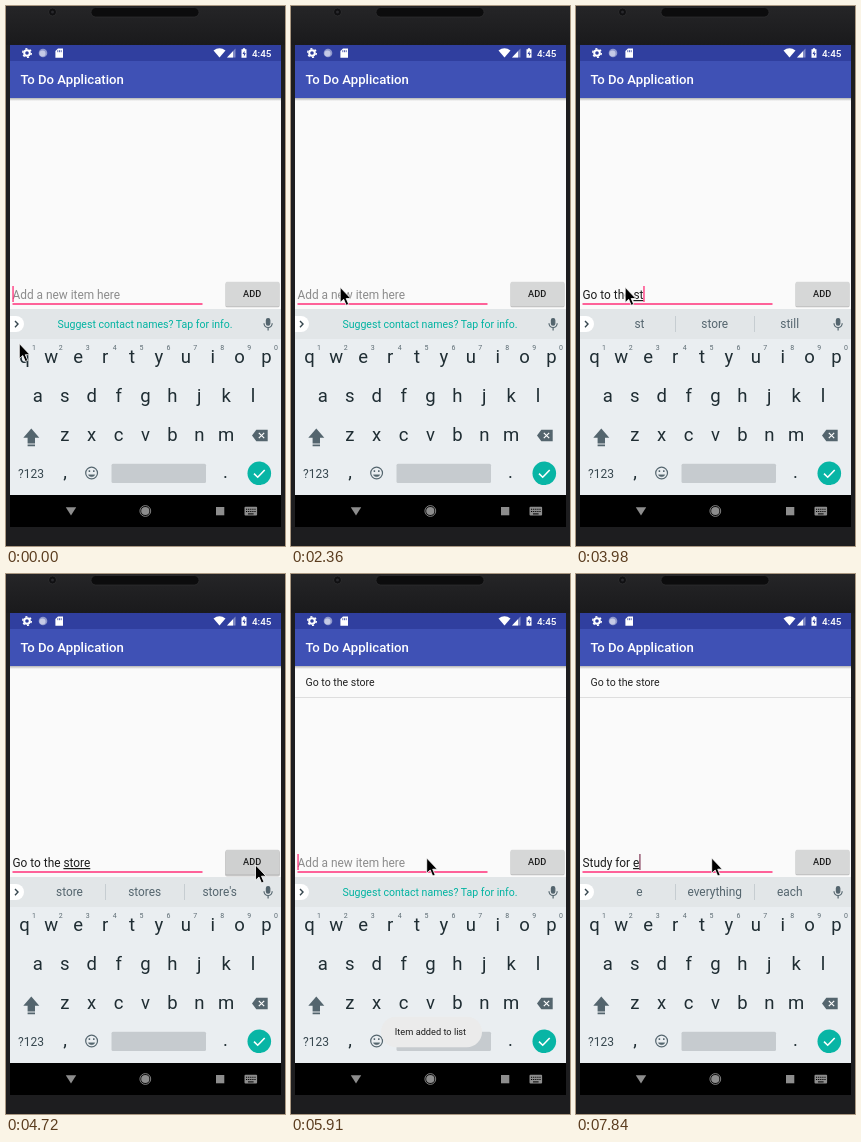
Recreate the animation shown at these times as an HTML page. Size 279 by 540 pixels, loop 8000 ms.

```html
<!DOCTYPE html>
<html lang="en">
<head>
<meta charset="utf-8">
<title>To Do</title>
<style>
html, body { margin: 0; width: 100%; height: 100%; overflow: hidden; background: #1d1d1f; }
svg { display: block; width: 100%; height: 100%; font-family: Roboto, sans-serif; }
text { white-space: pre; }
.mid { text-anchor: middle; }
.key { font-size: 18.5px; fill: #1f2d33; text-anchor: middle; }
.num { font-size: 7px; fill: #5c6b73; text-anchor: middle; }
.input { font-size: 11.87px; }
</style>
</head>
<body>
<svg viewBox="0 0 279 540">
  <defs>
    <linearGradient id="bezel" x2="0" y2="1">
      <stop offset="0" stop-color="#252527"/>
      <stop offset="1" stop-color="#1a1a1c"/>
    </linearGradient>
    <linearGradient id="shade" x2="0" y2="1">
      <stop offset="0" stop-color="#000" stop-opacity=".28"/>
      <stop offset="1" stop-color="#000" stop-opacity="0"/>
    </linearGradient>
  </defs>

  <!-- phone -->
  <rect width="279" height="540" fill="#1d1d1f"/>
  <rect width="279" height="39" fill="url(#bezel)"/>
  <rect x="85" y="1.5" width="108" height="9.5" rx="4.7" fill="#0c0c0d" stroke="#303032" stroke-width=".7"/>
  <circle cx="46.5" cy="6" r="4" fill="#101012" stroke="#303032" stroke-width=".8"/>
  <circle cx="46.5" cy="6" r="1.5" fill="#29292d"/>

  <!-- status and title bars -->
  <rect x="4" y="92" width="271" height="211" fill="#fafafa"/>
  <rect x="4" y="39" width="271" height="16" fill="#303f9f"/>
  <rect x="4" y="55" width="271" height="37" fill="#3f51b5"/>
  <rect x="4" y="92" width="271" height="3" fill="url(#shade)"/>
  <g fill="#fff">
    <circle cx="21" cy="47" r="2.8" fill="none" stroke="#fff" stroke-width="2"/>
    <circle cx="21" cy="47" r="4.3" fill="none" stroke="#fff" stroke-width="1.4" stroke-dasharray="2.1 2.4"/>
    <circle cx="37" cy="47" r="4.3" fill="#8f98cc"/>
    <circle cx="36.5" cy="47.5" r="3" fill="#c5cae6"/>
    <path d="M52 42.5h5v9.2h-7.6v-6.6z"/>
    <path d="M51.8 44.2v2M53.5 44.2v2M55.2 44.2v2" stroke="#303f9f" stroke-width=".8"/>
    <path d="M207.5 44.4Q213.5 39.9 219.5 44.4L213.5 51.6z"/>
    <path d="M221 51.5h8.5v-9z" opacity=".4"/>
    <path d="M221 51.5h6v-6.3z"/>
    <path d="M235.5 43.2h1.4v-1h2.2v1h1.4v8.6h-5z"/>
    <path d="M238.5 44.8l-2 3.2h1.4v2.6l2-3.4h-1.4z" fill="#303f9f"/>
    <text x="246" y="50.7" font-size="9.9" font-weight="500">4:45</text>
    <text x="14.6" y="78.3" font-size="13.15" font-weight="500">To Do Application</text>
  </g>

  <!-- list and entry row -->
  <g id="item">
    <text x="14.5" y="111.5" font-size="10.55" fill="#212121">Go to the store</text>
    <path d="M4 123.5H275" stroke="#dedede"/>
  </g>
  <rect id="press" x="219" y="277" width="55" height="25.5" rx="2" fill="#000" opacity=".2"/>
  <rect x="219.5" y="277" width="54" height="24.3" rx="1.5" fill="#bdbdbd"/>
  <rect id="button" x="219.5" y="275.8" width="54" height="24.5" rx="1.5" fill="#d6d7d7"/>
  <text class="mid" x="246.2" y="291.4" font-size="9.23" font-weight="500" fill="#1c1c1c">ADD</text>
  <text id="hint" class="input" x="6.5" y="293" fill="#8c8c8c">Add a new item here</text>
  <text id="entry" class="input" x="6.5" y="293" fill="#1c1c1c"><tspan id="plain"></tspan><tspan id="under" text-decoration="underline"></tspan></text>
  <path d="M6.5 298H196.5" stroke="#ff2f78" stroke-width="1.4"/>
  <rect id="caret" y="280" width="1.3" height="16"/>

  <!-- keyboard -->
  <rect x="4" y="303" width="271" height="186" fill="#eaeef1"/>
  <rect x="4" y="303" width="271" height="30" fill="#e2e6e8"/>
  <path d="M4 310h6a8 8 0 0 1 0 16H4z" fill="#fff"/>
  <path d="M9 315l3 3.1-3 3.1" fill="none" stroke="#37474f" stroke-width="1.4"/>
  <text id="tip" class="mid" x="139" y="322" font-size="10.55" fill="#00b3a1">Suggest contact names? Tap for info.</text>
  <g id="words" class="mid input" fill="#54656e">
    <path d="M99.5 310V326M178.5 310V326" stroke="#c6cdd1"/>
    <text x="63.5" y="322.4"></text>
    <text x="138.7" y="322.4"></text>
    <text x="213.7" y="322.4"></text>
  </g>
  <g stroke="#54656e" fill="none" stroke-width="1.2">
    <rect x="260.4" y="312.6" width="3.4" height="6.6" rx="1.7" fill="#54656e"/>
    <path d="M258 317.2a4.1 4.3 0 0 0 8.2 0M262.1 321.5v3"/>
  </g>
  <g id="keys"></g>
  <path d="M25.3 422.5l8 9.2h-4.3v5.8h-7.4v-5.8h-4.3zM21.6 438.6h7.4v1.6h-7.4z" fill="#54656e"/>
  <path d="M246 429.5l4.3-5.8h11.4v11.6h-11.4z" fill="#54656e"/>
  <path d="M252.8 426.8l5.4 5.4M258.2 426.8l-5.4 5.4" stroke="#fff" stroke-width="1.2"/>
  <text x="12" y="471.8" font-size="12" fill="#37474f">?123</text>
  <g fill="none" stroke="#54656e" stroke-width="1.2">
    <circle cx="85.6" cy="467" r="5.9"/>
    <path d="M82.3 468.8a3.6 3.2 0 0 0 6.6 0z" fill="#54656e" stroke-width=".4"/>
    <path d="M83.4 464.2v1.7M87.8 464.2v1.7" stroke-width="1.5"/>
  </g>
  <rect x="105.5" y="457.7" width="94.5" height="19.3" rx="1.5" fill="#c6cbcf"/>
  <circle cx="253.3" cy="467.3" r="11.8" fill="#08b5a5"/>
  <path d="M248 467.6l3.7 3.6 7-7.2" fill="none" stroke="#fff" stroke-width="1.6"/>

  <!-- navigation bar -->
  <rect x="4" y="489" width="271" height="32" fill="#000"/>
  <g fill="#8d8d8d">
    <path d="M59.8 501.2h10.4l-5.2 8.4z"/>
    <circle cx="139.3" cy="505" r="4.1"/>
    <circle cx="139.3" cy="505" r="5.4" fill="none" stroke="#8d8d8d" stroke-width=".9"/>
    <rect x="210" y="501" width="8.3" height="8.3"/>
    <rect x="238.5" y="500.8" width="12.6" height="8.7" rx="1"/>
    <path d="M240 503.2h9.6M240 505.5h9.6" stroke="#000" stroke-width="1.1" stroke-dasharray="1.2 .9"/>
    <path d="M242 507.9h5.6" stroke="#000"/>
  </g>

  <g id="toast">
    <rect x="90" y="442.8" width="101" height="30.5" rx="15.2" fill="#ebebeb"/>
    <text class="mid" x="139.5" y="461" font-size="9.23" fill="#1c1c1c">Item added to list</text>
  </g>
  <path id="mouse" d="M0 0V15.2L3.5 12 6 18 8.5 17 6 11.2H10.6z" fill="#000" stroke="#fff" stroke-width=".8"/>
</svg>
<script>
const $ = id => document.getElementById(id);
const LOOP = 8000;

// [time, x, y]
const MOUSE = [
  [0, 13.3, 337.5], [150, 36, 318], [300, 78.5, 291], [450, 62, 284], [600, 49.2, 281.3],
  [4430, 120, 284], [4570, 215, 289], [4720, 249.5, 291],
  [5010, 240, 290], [5160, 196, 287], [5310, 150, 284], [5460, 135.7, 284]
];
// [time, settled text, underlined text, suggestions]
const TYPED = [
  [0, '', ''],
  [2660, '', 'G'],
  [2810, '', 'Go', 'Go Good Got'],
  [2950, 'Go ', '', 'to for back'],
  [3100, 'Go ', 't', 't to the'],
  [3250, 'Go to ', '', 'the be a'],
  [3400, 'Go to ', 'th', 'the The their'],
  [3540, 'Go to ', 'the', 'the then they'],
  [3690, 'Go to the ', '', 'same gym next'],
  [3830, 'Go to the ', 's', 's same store'],
  [3980, 'Go to the ', 'st', 'st store still'],
  [4130, 'Go to the ', 'stor', 'store story storm'],
  [4280, 'Go to the ', 'store', "store stores store's"],
  [4870, '', ''],
  [6660, '', 'S'],
  [6950, '', 'Stu', 'Stuff Study Still'],
  [7090, '', 'Study', 'Study Studying Studies'],
  [7240, 'Study ', '', 'and for guide'],
  [7540, 'Study ', 'f', 'f for from'],
  [7690, 'Study for ', '', 'the a my'],
  [7840, 'Study for ', 'e', 'e everything each']
];
// [time, opacity]
const TOAST = [[0, 0], [4870, .35], [5010, .8], [5160, 1], [6950, .6], [7090, .3], [7240, .04], [7540, 0]];
const BLINKS = [450, 900, 1500, 1940, 2360, 2660, 4430, 4870, 5460, 5910, 6360, 6660];

const at = (steps, t) => steps.filter(s => s[0] <= t).pop();
const show = (el, on) => el.setAttribute('visibility', on ? 'visible' : 'hidden');
const label = (cls, x, y, s) => `<text class="${cls}" x="${x}" y="${y}">${s}</text>`;
const row = (cls, chars, x, y) => [...chars].map((c, i) => label(cls, x + 26.9 * i, y, c)).join('');

$('keys').innerHTML =
  row('key', 'qwertyuiop', 18.4, 357) + row('num', '1234567890', 27.9, 344) +
  row('key', 'asdfghjkl', 31.9, 396) + row('key', 'zxcvbnm', 58.8, 435) +
  label('key', 59, 472, ',') + label('key', 219.5, 472, '.');

const words = $('words').querySelectorAll('text');

function draw(t) {
  const [, plain, under, list] = at(TYPED, t);
  $('plain').textContent = plain;
  $('under').textContent = under;
  show($('hint'), !plain && !under);
  show($('tip'), !list);
  show($('words'), list);
  (list || '').split(' ').forEach((w, i) => words[i].textContent = w);

  const width = plain || under ? $('entry').getComputedTextLength() : 0;
  $('caret').setAttribute('x', 6.4 + width);
  $('caret').setAttribute('fill', t < 6660 ? '#ff2f78' : '#8a4560');
  show($('caret'), BLINKS.filter(b => b <= t).length % 2 === 0);

  const pressed = t >= 4720 && t < 4870;
  show($('press'), pressed);
  $('button').setAttribute('fill', pressed ? '#cfd0d0' : '#d6d7d7');
  show($('item'), t >= 4870);
  $('toast').setAttribute('opacity', at(TOAST, t)[1]);

  const [, x, y] = at(MOUSE, t);
  $('mouse').setAttribute('transform', `translate(${x} ${y})`);
}

const start = performance.now();
function tick() {
  draw((performance.now() - start) % LOOP);
  requestAnimationFrame(tick);
}
tick();
</script>
</body>
</html>
```
